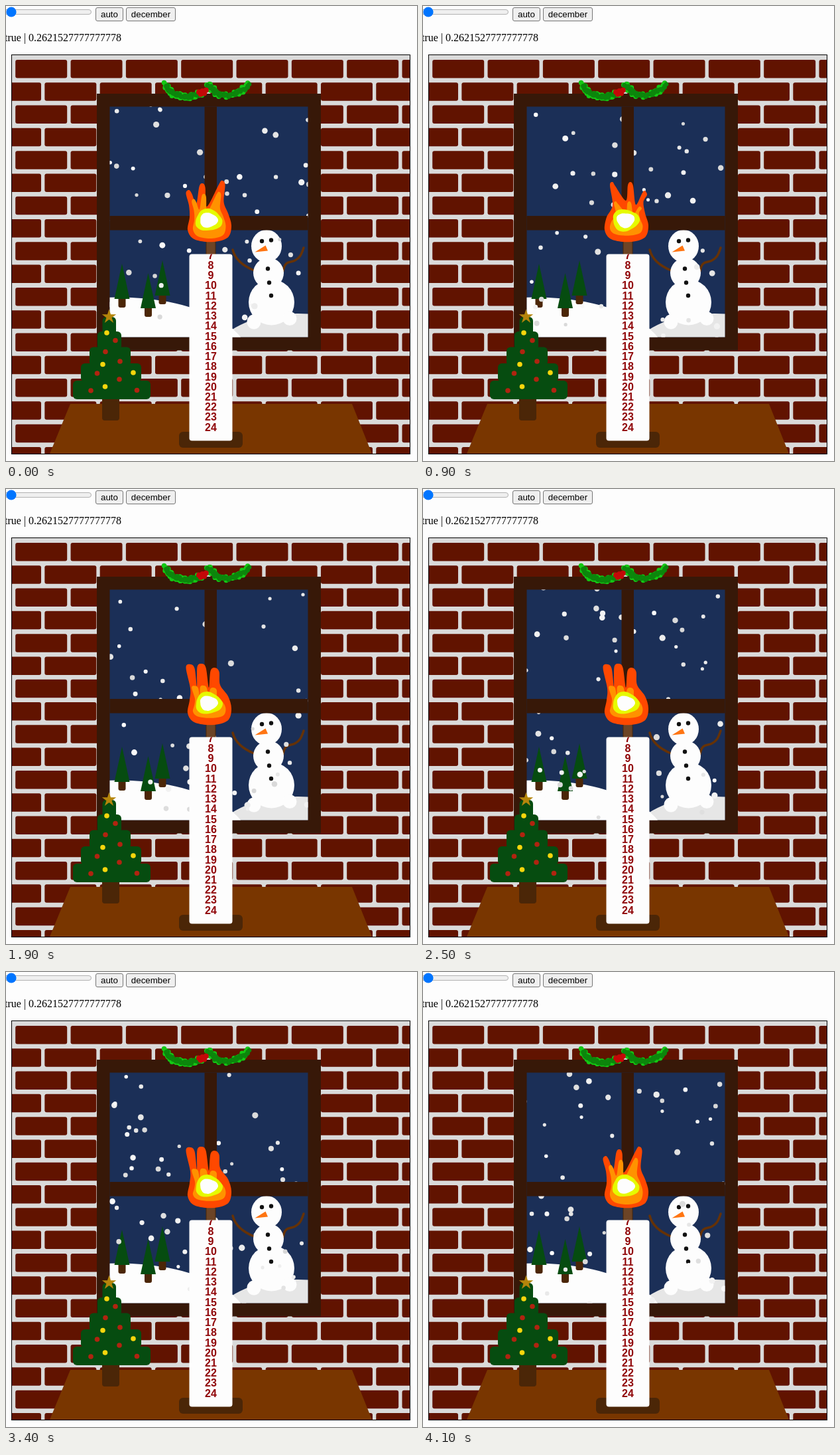
An HTML page for the animation above (4.2 s loop, 620x685 px).

```html
<!DOCTYPE html>
<html lang="en">
<head>
<meta charset="utf-8">
<title>Advent candle</title>
<style>
html, body { margin: 0; width: 620px; height: 685px; overflow: hidden; background: #fdfdfd; }
svg { display: block; }
.ui { font: 13.333px "Liberation Sans", Arial, sans-serif; text-anchor: middle; }
.info { font: 16px "Liberation Serif", "Times New Roman", serif; }
.days { font: bold 16px "Liberation Sans", Arial, sans-serif; text-anchor: middle; fill: #900508; }
</style>
</head>
<body>
<svg width="620" height="685" viewBox="0 0 620 685">
  <defs>
    <clipPath id="room"><rect x="9" y="74" width="600" height="600"/></clipPath>
    <clipPath id="glass"><rect x="156.5" y="151.5" width="299" height="347"/></clipPath>
    <clipPath id="wax"><rect x="276.5" y="373.5" width="65" height="281"/></clipPath>
  </defs>

  <rect x="-3.5" y="5.5" width="132" height="7" rx="3.5" fill="#efefef" stroke="#b2b2b2"/>
  <circle cx="8" cy="9" r="7.6" fill="#0075ff"/>
  <g fill="#efefef" stroke="#767676">
    <rect x="135.5" y="2.5" width="41" height="20" rx="2.5"/>
    <rect x="181.5" y="2.5" width="74" height="20" rx="2.5"/>
  </g>
  <text class="ui" x="156" y="17">auto</text>
  <text class="ui" x="218.5" y="17">december</text>
  <text class="info" x="-2" y="53">true | 0.2621527777777778</text>

  <rect x="8.5" y="73.5" width="601" height="601" fill="#dadada" stroke="#000"/>
  <g id="bricks" fill="#611300" clip-path="url(#room)"></g>

  <rect x="137" y="132" width="338" height="386.5" fill="#371808"/>
  <g clip-path="url(#glass)">
    <rect x="156" y="151" width="300" height="348" fill="#1b2f57"/>
    <ellipse cx="440" cy="520" rx="121" ry="57" fill="#e6e6e6"/>
    <ellipse cx="170" cy="528.5" rx="195" ry="90" fill="#fdfdfd"/>
    <g id="pines"></g>
    <g fill="none" stroke="#663206" stroke-width="3.5" stroke-linecap="round">
      <path d="M342 367Q347 387 374 398"/>
      <path d="M418 399C421 382 429 387 436 383S445 376 449 364"/>
    </g>
    <g fill="#fdfdfd">
      <ellipse cx="393" cy="361.5" rx="23" ry="24.5"/>
      <circle cx="396" cy="402" r="23"/>
      <circle cx="400.5" cy="446" r="34.5"/>
      <ellipse cx="374" cy="475.5" rx="10.5" ry="11"/>
      <circle cx="428" cy="470.5" r="10.5"/>
    </g>
    <g id="coal" fill="#111"></g>
    <path d="M375.5 370.5L391.5 360.5L395 368.5Z" fill="#ff7512"/>
    <g id="snow"></g>
    <path d="M299.5 151V316H156V337.5H456V316H318V151Z" fill="#371808"/>
  </g>

  <g id="garland"></g>
  <path d="M97 599H522L552 674H66Z" fill="#793600"/>

  <rect x="145" y="582" width="26" height="42" rx="4" fill="#4b2607"/>
  <g id="tree" fill="#064c10"></g>
  <g id="balls"></g>
  <path id="star" fill="#b5850b"/>

  <rect x="261" y="641" width="96" height="24" rx="6" fill="#4b2607"/>
  <rect x="302" y="345" width="14" height="31" fill="#6c4426" stroke="#4b2607"/>
  <rect x="276.5" y="373.5" width="65" height="281" rx="4" fill="#fdfdfd"/>
  <g id="days" class="days" clip-path="url(#wax)"></g>
  <g id="flame"></g>
</svg>
<script>
const LOOP = 4200, STEP = 100;
const $ = id => document.getElementById(id);

function add(parent, tag, attrs) {
  const el = document.createElementNS('http://www.w3.org/2000/svg', tag);
  for (const k in attrs) el.setAttribute(k, attrs[k]);
  return $(parent).appendChild(el);
}
const dot = (parent, cx, cy, r, fill) => add(parent, 'circle', fill ? { cx, cy, r, fill } : { cx, cy, r });
const box = (parent, x, y, width, height, rx, fill) =>
  add(parent, 'rect', fill ? { x, y, width, height, rx, fill } : { x, y, width, height, rx });

function seeded(s) {
  return () => (s = (s * 16807) % 2147483647) / 2147483647;
}

// Closed smooth curve through the given points
function smooth(p) {
  const n = p.length, at = i => p[(i + n) % n];
  let d = 'M' + p[0];
  for (let i = 0; i < n; i++) {
    const [a, b, c, e] = [at(i - 1), at(i), at(i + 1), at(i + 2)];
    const h1 = b.map((v, k) => v + (c[k] - a[k]) / 6);
    const h2 = c.map((v, k) => v - (e[k] - b[k]) / 6);
    d += `C${h1} ${h2} ${c}`;
  }
  return d + 'Z';
}

function buildWall() {
  for (let row = 0; row < 18; row++)
    for (let col = 0; col < 8; col++)
      box('bricks', (row % 2 ? -25 : 14.2) + col * 83.33, 81 + row * 34.29, 78, 27.5, 3);
}

function buildPines() {
  for (const [x, base] of [[236, 436], [175, 441], [214.5, 455]]) {
    box('pines', x - 5.5, base - 4, 11, 17, 3, '#4b2607');
    add('pines', 'path', { d: `M${x} ${base - 53}l11.5 53h-23Z`, fill: '#064c10' });
  }
}

function buildGarland() {
  const rnd = seeded(77);
  const arcs = [[[242, 118], [256, 147], [296, 131]], [[305, 117], [326, 152], [366, 119]]];
  const spots = [];
  for (const [a, b, c] of arcs)
    for (let u = 0; u <= 1; u += 1 / 44)
      spots.push([0, 1].map(k => (1 - u) ** 2 * a[k] + 2 * u * (1 - u) * b[k] + u * u * c[k]));
  const layer = (spread, r, fill) => spots.forEach(([x, y]) =>
    dot('garland', x + (rnd() - .5) * spread, y + (rnd() - .5) * spread, r, fill));
  layer(7, 3.7, '#14c814');
  layer(5, 3.3, '#0c860c');
  for (let i = 0; i < 5; i++)
    dot('garland', 291 + i * 2.7, 130.5 + (i % 2 ? 3 : -1) - i * .7, 4, '#c40808');
}

function buildTree() {
  for (const [x, y, w] of [[145.5, 468, 20.5], [138, 490, 36], [126, 513.5, 62], [113, 538, 91], [101, 564, 117]])
    box('tree', x, y, w, 28, 6);
  const hang = (fill, spots) => spots.forEach(([x, y]) => dot('balls', x, y, 3.8, fill));
  hang('#f8d60c', [[152, 492], [146, 539.5], [192, 552], [149.5, 573]]);
  hang('#b02410', [[165, 503.5], [150, 520.5], [172, 535], [137.5, 553], [171, 562], [128, 579], [197.5, 578.5]]);
  let d = '';
  for (let i = 0; i < 10; i++) {
    const a = i * Math.PI / 5, r = i % 2 ? 4.3 : 11.3;
    d += `${i ? 'L' : 'M'}${155.5 + r * Math.sin(a)} ${467.8 - r * Math.cos(a)}`;
  }
  $('star').setAttribute('d', d + 'Z');
}

// Three tongues with notches between them, on a round base
function fire({ tips: [a, b, c], notches: [m, n], w }) {
  const tongue = ([x, y]) => [[x - w, y + 5], [x, y], [x + w, y + 6]];
  return [
    [a[0], 300], ...tongue(a), m, ...tongue(b), n, ...tongue(c),
    [(c[0] + 331) / 2, 295], [335, 312], [340, 330], [336, 347],
    [321, 354], [301, 355], [282, 350], [274, 337], [277, 318]
  ];
}

// Wobbly ellipse for the hot core
function core(size, lean) {
  return Array.from({ length: 12 }, (_, i) => {
    const a = i * Math.PI / 6, r = size * (1 + .09 * Math.sin(3 * a + lean));
    return [305.5 + 20 * r * Math.cos(a), 322.5 + 16.5 * r * Math.sin(a)];
  });
}

const shrink = (p, sx, sy) => p.map(([x, y]) => [306 + (x - 306) * sx, 333 + (y - 333) * sy]);

const poses = [
  { tips: [[276, 277], [296, 267], [326, 263]], notches: [[287, 298], [303, 302]], w: 4.5, inner: .76, lean: .5 },
  { tips: [[286, 265], [313, 265], [334, 278]], notches: [[306, 293], [321, 299]], w: 4, inner: .57, lean: 2 },
  { tips: [[278, 264], [295, 263], [315, 269]], notches: [[288, 297], [306, 299]], w: 6.5, inner: .53, lean: 1 }
].map(p => {
  const outer = fire(p);
  return [outer, shrink(outer, .75, p.inner), core(1, p.lean), core(.67, p.lean + 1)].map(smooth);
});
const flame = ['#ff4800', '#ff9200', '#e6fa00', '#fdfdfd'].map(fill => add('flame', 'path', { fill }));

const SKY = { x: 152, y: 146, w: 308, h: 358 };
const rnd = seeded(20241);
const flakes = Array.from({ length: 54 }, () => {
  const shade = 214 + Math.floor(rnd() * 40);
  return {
    x: rnd() * SKY.w,
    y: rnd() * SKY.h,
    fall: 185 + rnd() * 40,
    drift: (rnd() - .5) * 100,
    el: dot('snow', 0, 0, 2.5 + rnd() * 2.2, `rgb(${shade},${shade},${shade})`)
  };
});
const wrap = (v, size) => ((v % size) + size) % size;

buildWall();
buildPines();
buildGarland();
buildTree();
for (const [x, y] of [[386, 354], [400, 352.5], [395, 395.5], [397, 416.5], [400, 436]]) dot('coal', x, y, 3.2);
for (let n = 7; n <= 24; n++)
  add('days', 'text', { x: 309, y: 396 + (n - 8) * 15.23 }).textContent = n;

function draw(ms) {
  const tick = Math.floor(ms / STEP);
  // The picture rests for one tick at these moments
  const moved = tick - [12, 24, 37].filter(rest => tick >= rest).length;
  const s = moved * LOOP / 39 / 1000;
  for (const f of flakes) {
    f.el.setAttribute('cx', SKY.x + wrap(f.x + f.drift * s, SKY.w));
    f.el.setAttribute('cy', SKY.y + wrap(f.y + f.fall * s, SKY.h));
  }
  const pose = poses[ms < 500 || ms >= 3800 ? 0 : ms < 1300 ? 1 : 2];
  flame.forEach((el, i) => el.setAttribute('d', pose[i]));
}

const begin = performance.now();
function tickFrame() {
  draw((performance.now() - begin) % LOOP);
  requestAnimationFrame(tickFrame);
}
tickFrame();
</script>
</body>
</html>
```
